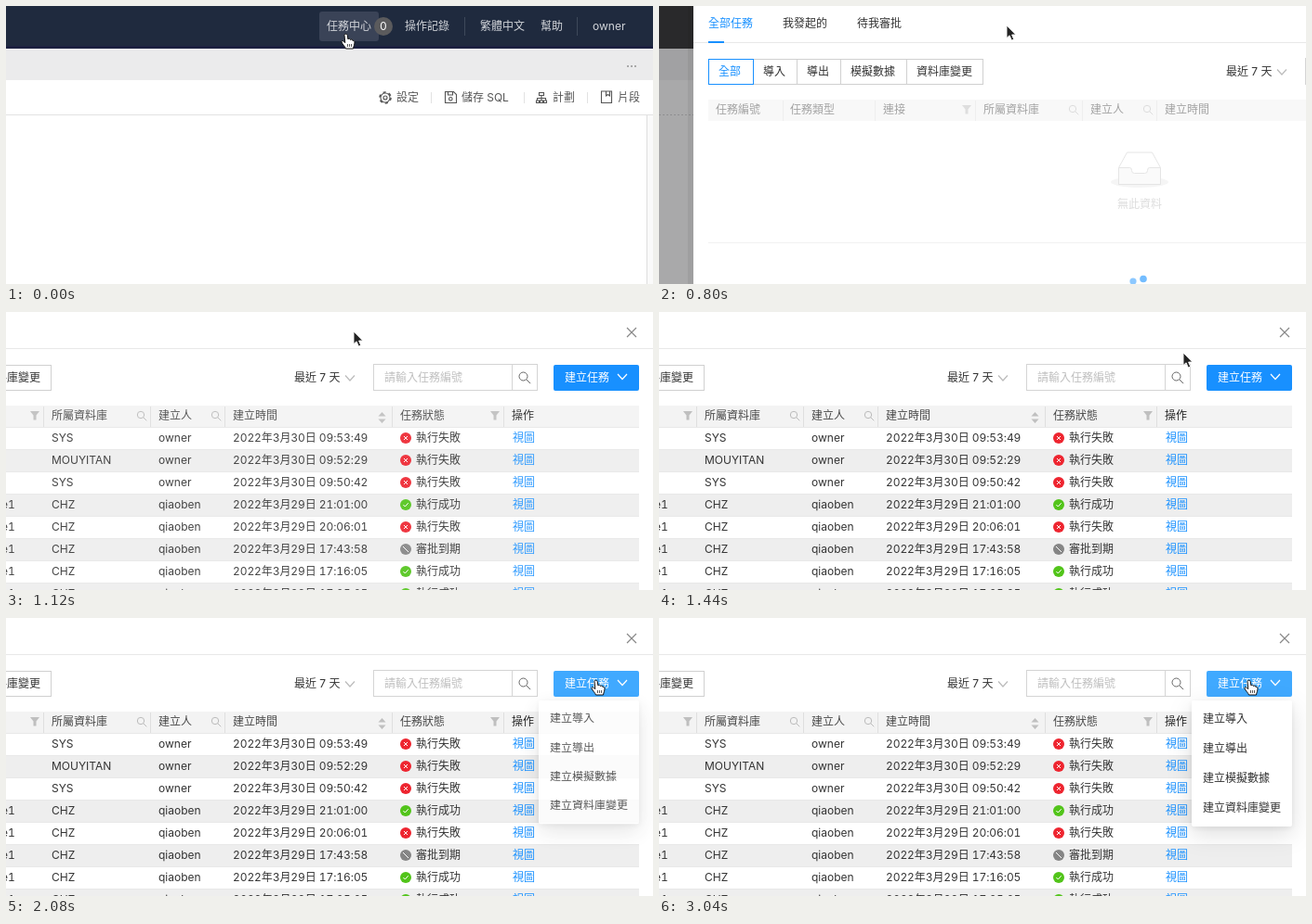
Write an HTML page that moves like this. It is 696x300 px and loops after 3.2 s.

```html
<!DOCTYPE html>
<html lang="zh-Hant">
<head>
<meta charset="utf-8">
<style>
html, body { margin: 0; width: 100%; height: 100%; overflow: hidden; background: #fff; }
svg { display: block; }
text { font: 12px Inter, "Noto Sans CJK TC", "Noto Sans CJK", sans-serif; font-variant-numeric: tabular-nums; white-space: pre; }
.date { letter-spacing: -.08px; }
#menu { filter: drop-shadow(0 2px 3px rgba(0,0,0,.07)) drop-shadow(0 8px 12px rgba(0,0,0,.13)); }
</style>
</head>
<body>
<svg id="stage" width="696" height="300" viewBox="0 0 696 300"></svg>
<script>
const BLUE = '#1890ff', LOOP = 3200, STEP = 160;

const text = (x, y, s, fill = '#333', more = '') => `<text x="${x}" y="${y}" fill="${fill}" ${more}>${s}</text>`;
const rect = (x, y, w, h, fill, more = '') => `<rect x="${x}" y="${y}" width="${w}" height="${h}" fill="${fill}" ${more}/>`;
const box = (x, y, w, h, color) => rect(x + .5, y + .5, w, h, 'none', `stroke="${color}"`);
const line = (d, color, more = '') => `<path d="${d}" fill="none" stroke="${color}" ${more}/>`;
const dot = (x, y, r, fill) => `<circle cx="${x}" cy="${y}" r="${r}" fill="${fill}"/>`;
const group = (id, body) => `<g id="${id}">${body}</g>`;
const lens = (x, y, r, color) =>
  line(`M${x - r} ${y}a${r} ${r} 0 1 1 ${2 * r} 0a${r} ${r} 0 1 1 ${-2 * r} 0M${x + r * .7} ${y + r * .7}l${r} ${r}`, color);
const funnel = x => `<path d="M${x - 5} 107h10l-3.5 4.5v5h-3v-5z" fill="#bfbfbf"/>`;
const chevron = (x, y, color) => line(`M${x} ${y}l5 5.5 5-5.5`, color, 'stroke-width="1.2"');

function page() {
  const nav = '#d2d5da', tool = '#555';
  return rect(0, 0, 696, 46, '#1f2a3e') + rect(0, 43, 696, 3, '#1c2040') +
    rect(337, 6, 64, 32, '#3a4357', 'rx="3"') +
    [[345, '任務中心'], [429, '操作記錄'], [510, '繁體中文'], [575, '幫助'], [631, 'owner']]
      .map(([x, s]) => text(x, 26, s, nav)).join('') +
    dot(406, 22, 10, '#5b5b5d') + text(406, 26.3, '0', '#fff', 'text-anchor="middle"') +
    line('M493.5 12v20M614.5 12v20', '#3d485a') +
    rect(0, 46, 696, 34, '#ebebec') +
    [669, 673, 677].map(x => dot(x, 65, .8, '#555')).join('') +
    line('M0 117.5H696', '#e2e2e2') + rect(690, 118, 6, 182, '#fafafa') + line('M689.5 118V300', '#dedede') +
    [[420, '設定'], [490, '儲存 SQL'], [588, '計劃'], [658, '片段']]
      .map(([x, s]) => text(x, 103, s, tool)).join('') +
    line('M457.5 93v12M557.5 93v12M625.5 93v12', '#e2e2e2') +
    `<g fill="none" stroke="${tool}" stroke-width="1.1">
      <circle cx="408" cy="99" r="2"/><circle cx="408" cy="99" r="5"/>
      <circle cx="408" cy="99" r="6" stroke-width="1.6" stroke-dasharray="3.1 3.18"/>
      <path d="M472.5 92.5h9l3 3v9h-12zM475.5 92.5v3.5h5v-3.5"/><circle cx="478.3" cy="100.3" r="1.8"/>
      <path d="M573.5 93.5h5v3h-5zM576 96.5v3M571.5 102v-2.5h9v2.5M576 99.5v2.5M570.5 102h3v2.5h-3zM574.5 102h3v2.5h-3zM578.5 102h3v2.5h-3z"/>
      <path d="M640.5 92h11v12.5h-11zM645.5 92v5l2-1.5 2 1.5v-5"/>
    </g>`;
}

const mask = () => rect(0, 0, 696, 300, '#a9a9aa') + rect(0, 46, 696, 34, '#a1a1a3') +
  rect(0, 0, 696, 46, '#29292b') + line('M0 117.5H696', '#8e8e90', 'stroke-dasharray="2 2"');

const states = {
  fail: ['執行失敗', '#ee2530', 'M-2-2L2 2M2-2L-2 2'],
  done: ['執行成功', '#52c41a', 'M-2.6 0L-.7 2 2.7-1.8'],
  late: ['審批到期', '#858585', 'M-3-3L3 3']
};
const tasks = [
  ['SYS', '30日 09:53:49', 'fail'], ['MOUYITAN', '30日 09:52:29', 'fail'], ['SYS', '30日 09:50:42', 'fail'],
  ['CHZ', '29日 21:01:00', 'done'], ['CHZ', '29日 20:06:01', 'fail'], ['CHZ', '29日 17:43:58', 'late'],
  ['CHZ', '29日 17:16:05', 'done'], ['CHZ', '29日 17:05:05', 'done']
];

function row([db, time, state], i) {
  const y = 140 + 24 * i, [label, color, mark] = states[state];
  return rect(-247, y - 16, 928, 24, i % 2 ? '#eee' : '#fff') +
    line(`M-247 ${y - 15.5}H681`, '#e8e8e8') +
    (i > 2 ? text(-5, y, 'e1') : '') + text(49, y, db) +
    text(164, y, i > 2 ? 'qiaoben' : 'owner') + text(244, y, '2022年3月' + time, '#333', 'class="date"') +
    dot(430, y - 4, 6, color) + line(mark, '#fff', `transform="translate(430 ${y - 4})"`) +
    text(441, y, label) + text(545, y, '視圖', BLUE);
}

const head = () => rect(-247, 101, 928, 23, '#f3f3f3') +
  [[-239, '任務編號'], [-159, '任務類型'], [-59, '連接'], [49, '所屬資料庫'], [164, '建立人'], [244, '建立時間'], [424, '任務狀態']]
    .map(([x, s]) => text(x, 116, s, '#484848')).join('') +
  text(544, 116, '操作', '#222', 'font-weight="500"') +
  [-167, -68, 40, 155, 235, 415, 535].map(x => line(`M${x + .5} 102v22`, '#dfdfdf')).join('') +
  funnel(31) + funnel(526) + lens(145, 111, 3.7, '#bbb') + lens(225, 111, 3.7, '#bbb') +
  '<path d="M400.5 112.5l4-4.5 4 4.5zM400.5 115.5l4 4.5 4-4.5z" fill="#bfbfbf"/>';

const empty = () => `<ellipse cx="217" cy="190" rx="31" ry="6" fill="#ececec"/>
  <path d="M194.5 174.5l9-16.5h27l9 16.5v18h-45z" fill="#fff" stroke="#ccc"/>
  <path d="M194.5 174.5h12q2 0 2 3t3 3h11q3 0 3-3t2-3h12v18h-45z" fill="#f6f6f6" stroke="#ccc"/>` +
  text(193, 218, '無此資料', '#bbb') + line('M-247 255.5H681', '#e4e4e4');

function drawer() {
  const filters = [[-247, 48, '全部'], [-199, 47, '導入'], [-152, 47, '導出'], [-105, 71, '模擬數據'], [-34, 82, '資料庫變更']];
  return rect(-269, 0, 6, 300, '#000', 'opacity=".06"') + rect(-263, 0, 1000, 300, '#fff') +
    text(-247, 23, '全部任務', BLUE, 'font-weight="600"') + text(-167, 23, '我發起的') + text(-87, 23, '待我審批') +
    line('M-263 39.5H740', '#e8e8e8') + rect(-247, 38, 17, 2, BLUE) +
    filters.map(([x, w, s]) => box(x, 57, w, 27, '#d0d0d0') + text(x + 11, 75, s, x === -247 ? BLUE : '#333')).join('') +
    box(-247, 57, 48, 27, BLUE) +
    text(310, 75, '最近 7 天', '#333', 'word-spacing="-.4"') + chevron(365, 68.5, '#bbb') +
    box(395, 56, 176, 28, '#d4d4d4') + line('M544.5 57v27', '#d4d4d4') +
    text(407, 75, '請輸入任務編號', '#bfbfbf') + lens(556.5, 69.5, 4.5, '#666') +
    rect(589, 57, 92, 28, BLUE, 'rx="2" id="create"') + text(601, 75, '建立任務', '#fff') + chevron(658, 67, '#fff') +
    line('M668 17l10 10M678 17l-10 10', '#888', 'stroke-width="1.2"') +
    group('table', head() + group('rows', tasks.map(row).join('')) + group('empty', empty())) +
    group('spin', dot(210, 297, 3.6, '#8cc8ff') + dot(221, 294.5, 3.8, '#74bdff') +
      dot(224, 305, 4, '#4aa8ff') + dot(213, 308, 3.8, '#a9d6ff'));
}

const menu = () => rect(573, 89, 108, 136, '#fff', 'rx="2"') +
  ['建立導入', '建立導出', '建立模擬數據', '建立資料庫變更'].map((s, i) => text(585, 113 + 32 * i, s)).join('');

const arrow = '<path d="M0 0V13.5L3.1 10.8 5.3 16 7.7 15 5.6 10H9.8Z" fill="#222" stroke="#fff" stroke-width=".9"/>';
const hand = `<path d="M-2 1.5C-2-.2 1-.2 1.2 1.5L2 6C2.5 5 4.5 5 4.6 6.6 5.3 5.6 7 6 7 7.6
  8 7 9 7.6 9 9 9 12 8 13 7.5 16H-.5C-1 14-4 11.5-5 9-5.5 7.6-3.6 7-2.4 8.6L-1.2 9.6Z" fill="#fff" stroke="#111"/>
  <path d="M1.5 11v3M3.5 11v3M5.5 11v3" stroke="#111" stroke-width=".7"/>`;

const $ = id => document.getElementById(id);
$('stage').innerHTML = group('page', page()) + group('mask', mask()) + group('drawer', drawer()) +
  group('menu', menu()) + group('arrow', arrow) + group('hand', hand);

// start time, x, y
const moves = [[0, 366, 30], [160, 376, 25], [320, 375, 22], [800, 374, 21], [1440, 564, 44], [1600, 657, 52], [1760, 635, 67]];
const clamp = v => Math.min(1, Math.max(0, v));
const smooth = v => (v = clamp(v), v * v * (3 - 2 * v));
const show = (id, on) => $(id).style.display = on ? '' : 'none';
const place = (id, x, y) => $(id).setAttribute('transform', `translate(${x} ${y})`);

function draw(t) {
  const open = t >= 800, loaded = t >= 960;
  show('mask', open);
  show('drawer', open);
  place('drawer', Math.round(300 * Math.exp((800 - t) / 37)), 0);
  show('rows', loaded);
  show('empty', !loaded);
  show('spin', !loaded);
  $('table').style.opacity = .5 + .5 * smooth((t - 900) / 300);
  $('create').setAttribute('fill', t < 1920 ? BLUE : t >= 2400 && t < 2880 ? '#2b97f7' : '#40a9ff');

  const drop = clamp((t - 1960) / 150);
  show('menu', drop > 0);
  $('menu').style.opacity = drop;
  $('menu').setAttribute('transform', `translate(0 89) scale(1 ${.8 + .2 * smooth(drop)}) translate(0 -89)`);

  const [, x, y] = moves.filter(m => m[0] <= t).pop();
  const pointing = t < 800 || t >= 1760;
  show('hand', pointing);
  show('arrow', !pointing);
  place(pointing ? 'hand' : 'arrow', x, y);
}

const start = performance.now();
function tick() {
  const t = (performance.now() - start) % LOOP;
  draw(Math.floor(t / STEP) * STEP);
  requestAnimationFrame(tick);
}
tick();
</script>
</body>
</html>
```
